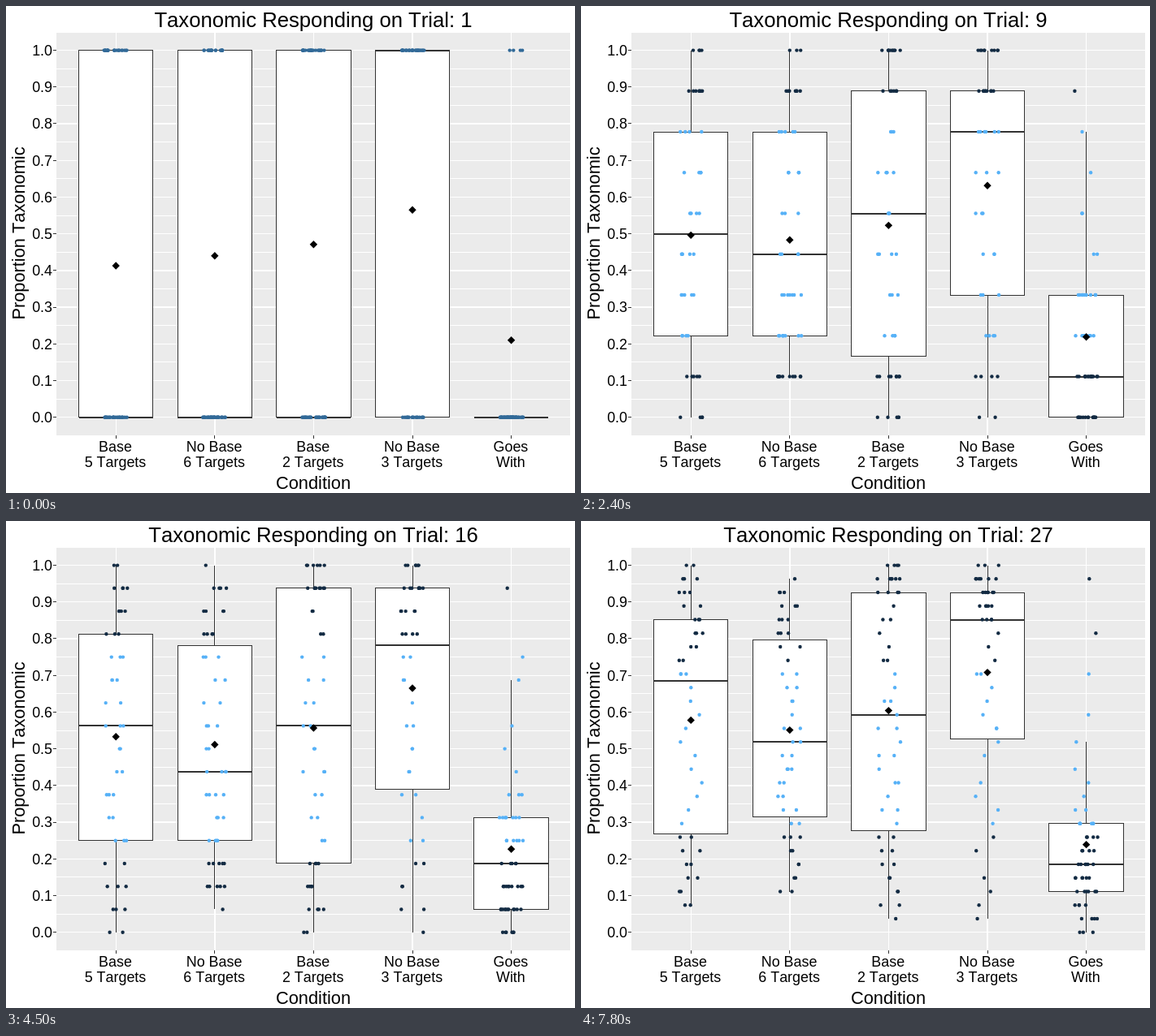
Write an HTML page that moves like this. It is 700 px wide and 600 px high and loops after 8000 ms.

```html
<!DOCTYPE html>
<html lang="en">
<head>
<meta charset="utf-8">
<title>Taxonomic Responding</title>
<style>
  html, body { margin: 0; width: 100%; height: 100%; overflow: hidden; background: #fff; }
  svg { display: block; width: 700px; height: 600px; }
  text {
    font-family: "Liberation Sans", Arial, sans-serif;
    font-kerning: none;
    text-anchor: middle;
  }
  .title { font-size: 25.7px; }
  .name { font-size: 21.8px; }
  .tick { font-size: 17.9px; }
  .end { text-anchor: end; }
  .line { fill: none; stroke: #333; shape-rendering: crispEdges; }
  .box { fill: #fff; }
  .median { stroke-width: 2; }
  .minor, .major { fill: none; stroke: #fff; shape-rendering: crispEdges; }
  .major { stroke-width: 1.4; }
</style>
</head>
<body>
<svg viewBox="0 0 700 600">
  <rect width="700" height="600" fill="#fff"/>
  <rect x="62" y="33" width="632" height="496" fill="#ebebeb"/>
  <g id="axes"></g>
  <text class="name" x="378" y="595">Condition</text>
  <text class="name" transform="translate(23 280) rotate(-90)">Proportion Taxonomic</text>
  <text class="title" x="378" y="26" id="title"></text>
  <g id="plot"></g>
</svg>
<script>
const STEP = 300, LOOP = 8000, LAST = 27;
const MID = '#326a98', DARK = '#132b43', LIGHT = '#56b1f7';

// from, to: lowest, quartiles and highest share on the first and last trial
// pace, drift: easing of the spread and of the mean; tail: bend of the top quarter
const conditions = [
  { label: ['Base', '5 Targets'], size: 46, pace: 2, drift: .58, tail: 1,
    from: [-.05, .24, .475, .81, 1], to: [.074, .268, .685, .852, 1], mean: [.413, .578] },
  { label: ['No Base', '6 Targets'], size: 51, pace: .5, drift: .8, tail: 1,
    from: [0, .05, .25, .75, 1.02], to: [.111, .315, .53, .795, .955], mean: [.44, .551] },
  { label: ['Base', '2 Targets'], size: 51, pace: 1, drift: .8, tail: 1,
    from: [-.02, .1, .49, .92, 1], to: [.037, .278, .593, .93, 1], mean: [.471, .604] },
  { label: ['No Base', '3 Targets'], size: 46, pace: 2, drift: .65, tail: 1,
    from: [.012, .32, .76, .93, 1], to: [.037, .52, .852, .93, 1], mean: [.565, .708] },
  { label: ['Goes', 'With'], size: 53, pace: 1, drift: 1, tail: 3,
    from: [0, .02, .13, .33, .82], to: [0, .111, .185, .3, .97], mean: [.21, .239] }
];

const $ = id => document.getElementById(id);
const xAt = i => 135.2 + i * 121.6;
const yAt = v => 506.75 - v * 452.2;
const mix = (a, b, f) => a + (b - a) * f;
const path = (cls, d) => `<path class="${cls}" d="${d}"/>`;
const text = (cls, x, y, s) => `<text class="${cls}" x="${x}" y="${y}">${s}</text>`;

function random(seed) {
  return () => {
    seed = (seed + 0x6d2b79f5) | 0;
    let r = Math.imul(seed ^ (seed >>> 15), 1 | seed);
    r = (r + Math.imul(r ^ (r >>> 7), 61 | r)) ^ r;
    return ((r ^ (r >>> 14)) >>> 0) / 4294967296;
  };
}

// two-sided binomial test against chance at the 5% level
function differs(k, n) {
  const edge = Math.max(k, n - k);
  let term = 1, tail = 0;
  for (let i = 0; i <= n - edge; i++) {
    tail += term;
    term *= (n - i) / (i + 1);
  }
  return 2 * tail / 2 ** n < .05;
}

function dotColor(k, n) {
  if (n < 6) return MID;
  return differs(k, n) ? DARK : LIGHT;
}

const progress = n => (n - 1) / (LAST - 1);

// sorted whole answers of the group after n trials
function scores(c, n) {
  const f = progress(n) ** c.pace;
  const knots = c.from.map((v, j) => mix(v, c.to[j], f));
  return Array.from({ length: c.size }, (_, i) => {
    const p = 4 * i / (c.size - 1), j = Math.min(3, Math.floor(p));
    const share = mix(knots[j], knots[j + 1], (p - j) ** (j === 3 ? c.tail : 1));
    return Math.min(n, Math.max(0, Math.round(share * n)));
  });
}

function quantile(sorted, p) {
  const h = (sorted.length - 1) * p, i = Math.floor(h);
  return mix(sorted[i], sorted[i + 1], h - i);
}

function boxplot(x, sorted, n) {
  const quarts = [.25, .5, .75].map(p => quantile(sorted, p));
  const reach = 1.5 * (quarts[2] - quarts[0]);
  const inside = sorted.filter(k => k >= quarts[0] - reach && k <= quarts[2] + reach);
  const [q1, med, q3, lo, hi] = [...quarts, inside[0], inside[inside.length - 1]].map(k => yAt(k / n));
  const l = x - 45.7, r = x + 45.7;
  return path('line', `M${x} ${hi}V${q3}M${x} ${q1}V${lo}`) +
    path('line box', `M${l} ${q3}H${r}V${q1}H${l}Z`) +
    path('line median', `M${l} ${med}H${r}`);
}

function group(c, i, n) {
  const x = xAt(i), sorted = scores(c, n), rnd = random(n * 101 + i * 7919);
  const dots = sorted.map(k => {
    const dx = (rnd() * 2 - 1) * 14.6;
    return `<circle cx="${(x + dx).toFixed(1)}" cy="${yAt(k / n).toFixed(1)}" r="2.2" fill="${dotColor(k, n)}"/>`;
  });
  const y = yAt(mix(...c.mean, progress(n) ** c.drift));
  return { box: boxplot(x, sorted, n), dots: dots.join(''),
    mark: path('', `M${x - 4.7} ${y}l4.7 -4.7 4.7 4.7 -4.7 4.7Z`) };
}

function drawAxes() {
  let minor = '', major = '', ticks = '', labels = '';
  for (let i = 0; i <= 10; i++) {
    const y = yAt(i / 10);
    if (i < 10) minor += `M62 ${yAt(i / 10 + .05)}H694`;
    major += `M62 ${y}H694`;
    ticks += `M58 ${y}H62`;
    labels += text('tick end', 57, y + 6.3, (i / 10).toFixed(1));
  }
  conditions.forEach((c, i) => {
    const x = xAt(i);
    major += `M${x} 33V529`;
    ticks += `M${x} 529V533`;
    c.label.forEach((s, j) => labels += text('tick', x - .7, 549 + j * 19, s));
  });
  $('axes').innerHTML = path('minor', minor) + path('major', major) + path('line', ticks) + labels;
}

function drawTrial(n) {
  const groups = conditions.map((c, i) => group(c, i, n));
  $('title').textContent = 'Taxonomic Responding on Trial: ' + n;
  $('plot').innerHTML = ['box', 'dots', 'mark'].map(k => groups.map(g => g[k]).join('')).join('');
}

let shown = 0;
function tick() {
  const n = Math.min(LAST, 1 + Math.floor(performance.now() % LOOP / STEP));
  if (n !== shown) drawTrial(shown = n);
  requestAnimationFrame(tick);
}

drawAxes();
tick();
</script>
</body>
</html>
```
